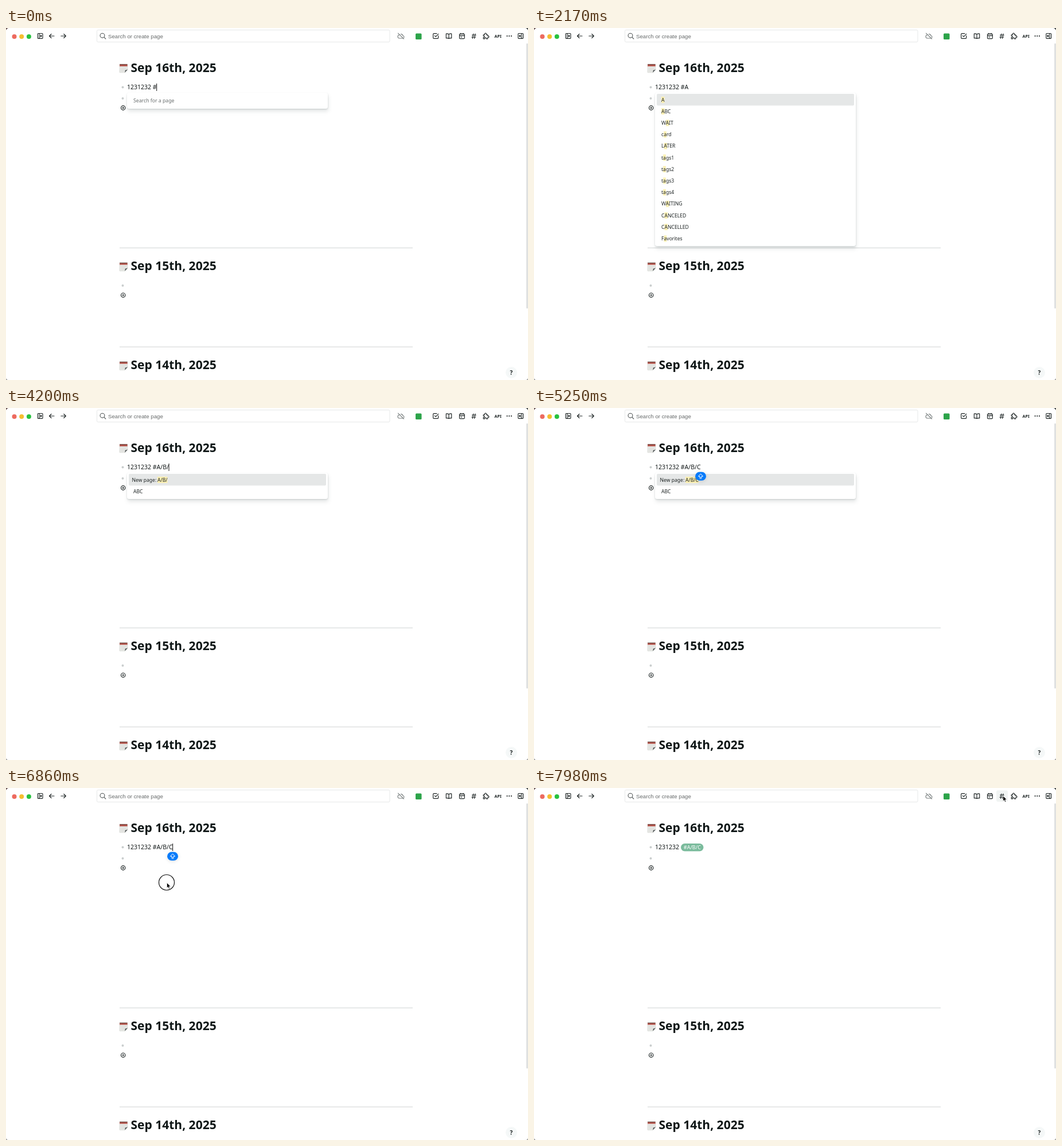
Recreate the animation shown at these times as an HTML page. Size 910 by 615 pixels, loop 8 s.

```html
<!DOCTYPE html>
<html lang="en">
<head>
<meta charset="utf-8">
<title>Journal tag typing</title>
<style>
html, body { margin: 0; width: 100%; height: 100%; overflow: hidden; background: #fff; }
svg { display: block; width: 910px; height: 615px; font-family: "Noto Sans", sans-serif; }
text { white-space: pre; }
.icon { fill: none; stroke: #1d2424; stroke-width: 1.15; stroke-linecap: round; stroke-linejoin: round; }
.title { font-size: 21px; font-weight: 700; fill: #0f1717; }
.block { font-size: 10.5px; fill: #141a1a; }
.row { font-size: 8.6px; fill: #202626; }
.popup { filter: drop-shadow(0 1px 1.2px rgba(20,40,40,.17)) drop-shadow(1px 5px 3px rgba(20,40,40,.1)); }
.badge { filter: drop-shadow(0 1px 2px rgba(0,0,0,.28)) drop-shadow(0 2px 4px rgba(0,0,0,.1)); }
.caps { filter: drop-shadow(0 1px 3px rgba(0,0,0,.12)); }
</style>
</head>
<body>
<svg viewBox="0 0 910 615">
  <defs>
    <g id="calendar">
      <path d="M.6 1H14L14.6 10.6 9.6 16H1.2Q.2 16 .2 15Z" fill="#e6e7e4" stroke="#d0d2cf" stroke-width=".5"/>
      <path d="M.7 1.2H13.9L14.2 5H.5Z" fill="#b9584f"/>
      <path d="M.7 1.2H13.9V2.6H.6Z" fill="#6d4540"/>
      <path d="M14.6 10.6 9.6 16 10.1 11.8Z" fill="#565b5b"/>
      <path d="M3 8H12M3 10.5H9M3 13H8" stroke="#d3d5d2" stroke-width=".6"/>
    </g>
    <g id="add" class="icon" stroke-width="1">
      <circle r="3.7"/><path d="M-1.3 0H1.3M0-1.3V1.3"/>
    </g>
    <path id="pointer" d="M0 0V9.4L2.1 7.5 3.5 10.8 5.2 10.1 3.8 6.9H6.7Z" fill="#000" stroke="#fff" stroke-width=".8" stroke-linejoin="round"/>
  </defs>

  <rect width="910" height="615" fill="#fff"/>
  <path d="M0 0H4Q1 1 0 4Z" fill="#614c4c"/>
  <path d="M910 0H906Q909 1 910 4Z" fill="#3c4040"/>
  <path d="M0 615V612Q1 614 3 615ZM910 615V612Q909 614 907 615Z" fill="#999"/>
  <rect x="907" y="27" width="3" height="463" rx="1" fill="#dfe1e1"/>

  <circle cx="14.5" cy="15" r="4" fill="#ed6a5f"/>
  <circle cx="27.2" cy="15" r="4" fill="#f5be30"/>
  <circle cx="39.9" cy="15" r="4" fill="#28c23f"/>
  <rect x="158.5" y="3.5" width="510.5" height="21" rx="2" fill="#fff" stroke="#e6e8e8"/>
  <text x="178" y="18" font-family="Liberation Sans, sans-serif" font-size="9.7" fill="#676b6b">Search or create page</text>

  <rect id="hover" x="806" y="4" width="20" height="20" rx="3" fill="#f1f4f3"/>
  <g class="icon">
    <rect x="55.2" y="9.5" width="8.8" height="8.8" rx="1"/><path d="M58 9.5V18.3M60.3 12.4V15.5L62.2 13.9Z"/>
    <path d="M84 14H75.5M79 10.5 75.5 14 79 17.5M95.8 14H104.3M100.8 10.5 104.3 14 100.8 17.5"/>
    <g stroke="#555b5b"><circle cx="168" cy="13.2" r="3.9"/><path d="M171 16.2 173.8 19"/></g>
    <path stroke="#7a8080" d="M683.5 9.2 693.5 19M686.2 11.7Q683 12.3 683 15.2 683.3 18 686 18H691.6M688.2 10.7Q691.2 10.5 692 13.5 694.6 14.2 693.6 17"/>
    <path d="M753.7 13.5V17Q753.7 18.4 752.3 18.4H746Q744.6 18.4 744.6 17V11Q744.6 9.6 746 9.6H751M747.2 13.3 749.2 15.2 753.8 10.4"/>
    <path d="M772 11Q769.5 9.3 767.3 10.1V17.8Q769.7 17.2 772 18.5 774.3 17.2 776.7 17.8V10.1Q774.5 9.3 772 11V18.4"/>
    <rect x="790.5" y="10.3" width="8.8" height="8.3" rx="1.2"/><path d="M790.5 13.3H799.3M792.8 9V11M797 9V11M793 15.8H794.4"/>
    <path d="M812.5 12.2H819.2M811.8 16H818.5M814.8 10 813.4 18.3M818 10 816.6 18.3"/>
    <path d="M832.2 11.8H834.6Q834 9 836 9 838 9 837.4 11.8H839.8V14Q842 13.5 842 15.2 842 17 839.8 16.4V18.8H837.3Q837.6 16.8 836 16.8 834.4 16.8 834.7 18.8H832.2V16.4Q834.4 16.5 834.4 15.2 834.4 13.9 832.2 14Z"/>
    <rect x="892.8" y="9.5" width="8.8" height="8.8" rx="1"/><path d="M898.8 9.5V18.3M896.5 12.4V15.5L894.6 13.9Z"/>
  </g>
  <rect x="714" y="9.5" width="10.5" height="10.5" rx="1.5" fill="#2da44a"/>
  <text x="857.6" y="17" text-anchor="middle" font-size="7.2" font-weight="800" fill="#1d2424">API</text>
  <g fill="#1d2424"><circle cx="873.6" cy="14" r="1.1"/><circle cx="877.3" cy="14" r="1.1"/><circle cx="881" cy="14" r="1.1"/></g>

  <g id="journal"></g>
  <circle cx="203.5" cy="103.5" r="2" fill="#c9cdcd"/>
  <circle cx="203.5" cy="123" r="2" fill="#c9cdcd"/>
  <use href="#add" x="204.2" y="139.6"/>
  <circle cx="203.5" cy="450" r="2" fill="#c9cdcd"/>
  <use href="#add" x="204.2" y="466.7"/>
  <path d="M198 384.2H709M198 557.2H709" stroke="#dfe1e1" stroke-width="1.4"/>
  <circle cx="881" cy="602" r="10" fill="#f5f8f8"/>
  <text x="881" y="605.6" text-anchor="middle" font-size="10" font-weight="700" fill="#1d2424">?</text>

  <g id="scene"></g>
</svg>
<script>
const LOOP = 8000, STEP = 70, LEFT = 211;
const TAGS = ["A", "ABC", "WAIT", "card", "LATER", "tags1", "tags2", "tags3", "tags4",
  "WAITING", "CANCELED", "CANCELLED", "Favorites"];
const $ = id => document.getElementById(id);
const pen = document.createElement("canvas").getContext("2d");

function widthOf(text, size) {
  pen.font = `100px "Noto Sans", sans-serif`;
  return pen.measureText(text).width * size / 100;
}
const within = (t, from, to) => t >= from && t < to;
const clamp = v => Math.min(1, Math.max(0, v));
const mix = (a, b, p) => a + (b - a) * p;
// The value of the last [time, value] pair already reached.
const latest = (pairs, t) => pairs.filter(p => t >= p[0]).pop()[1];

const TYPED = [[0, "#"], [350, "#A"], [2310, "#A/"], [3150, "#A/B"], [4200, "#A/B/"], [4760, "#A/B/C"]];
const CARET = [[0, 1], [1120, 0], [1610, 1], [2170, 0], [2310, 1], [2870, 0], [3150, 1], [3710, 0],
  [4200, 1], [5250, 0], [5810, 1], [6300, 0], [6790, 1]];
const CAPS = [[2870, 3150], [3710, 4200], [5250, 5740], [6300, 6930]];
const TAGGED = 6930;

const rowText = (x, y, text) => `<text class="row" x="${x}" y="${y + 3.1}">${text}</text>`;
const mark = (x, y, text) =>
  `<rect x="${x}" y="${y - 5.5}" width="${widthOf(text, 8.6)}" height="11" fill="#fcf1b4"/>`;
const panel = bottom =>
  `<rect class="popup" x="211" y="113" width="350" height="${bottom - 113}" rx="3.5" fill="#fff"/>`;
const selection = height =>
  `<rect x="214" y="115" width="344" height="${height}" rx="2" fill="#e5e7e7"/>`;

function tagList(first, pitch, marked) {
  const rows = TAGS.map((tag, i) => {
    const y = first + i * pitch, at = tag.search(/a/i);
    const hit = marked && at >= 0 ? mark(222 + widthOf(tag.slice(0, at), 8.6), y, tag[at]) : "";
    return hit + rowText(222, y, tag);
  });
  return panel(first + 12 * pitch + 13) + selection(pitch + .3) + rows.join("");
}

function newPage(name) {
  return panel(159) + selection(20.5) + rowText(219.5, 125.5, "New page:") +
    mark(264, 125.5, name) + rowText(264, 125.5, name) + rowText(222, 146, "ABC");
}

function popup(t, typed) {
  if (t < 350) return panel(141) +
    `<text x="222" y="130" font-size="8.7" fill="#6a6f6f">Search for a page</text>`;
  if (t < 2380) return tagList(125.4, 20.21, true);
  if (t < 3150) return tagList(126, 20.83, false);
  return t < 5740 ? newPage(typed.slice(1)) : "";
}

function inputBadge(t) {
  if (!within(t, 350, 1610)) return "";
  const p = clamp((t - 280) / 280);
  return `<g class="badge" opacity="${p}"><rect x="263" y="113" width="21.5" height="22" rx="4" fill="#fff"/>
    <text x="273.7" y="128.2" text-anchor="middle" font-family="Inter, sans-serif" font-size="11.8" fill="#414646">A</text></g>`;
}

function capsBadge(t, x) {
  if (!CAPS.some(([from, to]) => within(t, from, to))) return "";
  return `<g class="caps" transform="translate(${x} 119.2)">
    <rect x="-9.5" y="-7.5" width="19" height="15" rx="7.5" fill="#087bfa"/>
    <path d="M0-4.3 4 .1H1.9V2H-1.9V.1H-4ZM-1.9 4H1.9" fill="none" stroke="#fff" stroke-width="1" stroke-linejoin="round"/></g>`;
}

function pointerAt(t) {
  const nudge = clamp((t - 6930) / 140), p = clamp((t - 7210) / 770);
  const ease = p < .5 ? 4 * p ** 3 : 1 - (2 - 2 * p) ** 3 / 2;
  return [mix(mix(280.4, 274.8, nudge), 817.6, ease), mix(mix(165.4, 161.4, nudge), 13.6, ease)];
}

function pointer(t) {
  if (t < 6580) return "";
  const [x, y] = pointerAt(t);
  const ring = within(t, 6790, 7070)
    ? `<circle cx="280" cy="165" r="13.5" fill="none" stroke="#111" stroke-width="1.2" opacity="${t < 6860 ? .6 : t < 7000 ? 1 : .4}"/>` : "";
  return ring + `<use href="#pointer" x="${x}" y="${y}" opacity="${t < 6650 ? .6 : 1}"/>`;
}

function block(t, typed, caretX) {
  if (t >= TAGGED) return `<text class="block" x="${LEFT}" y="107.2">1231232</text>
    <rect x="256" y="97" width="39.5" height="13.5" rx="6.75" fill="#7abb9c"/>
    <text x="260.8" y="107" font-size="9.1" fill="#fff">#A/B/C</text>`;
  const caret = latest(CARET, t) ? `<rect x="${caretX - .4}" y="97" width="1" height="13" fill="#111"/>` : "";
  return `<text class="block" x="${LEFT}" y="107.2">1231232 ${typed}</text>` + caret;
}

let shown = -1;
function draw(now) {
  const t = Math.floor(now % LOOP / STEP) * STEP;
  if (t !== shown) {
    shown = t;
    const typed = latest(TYPED, t);
    const caretX = LEFT + widthOf("1231232 " + typed, 10.5);
    $("scene").innerHTML = popup(t, typed) + block(t, typed, caretX) +
      inputBadge(t) + capsBadge(t, caretX) + pointer(t);
    const [x, y] = pointerAt(t);
    $("hover").style.display = x > 806 && y < 24 ? "" : "none";
  }
  requestAnimationFrame(draw);
}

$("journal").innerHTML = [[16, 76.5], [15, 423.2], [14, 596.2]].map(([day, y]) =>
  `<use href="#calendar" x="197.6" y="${y - 14.5}"/><text class="title" x="217.5" y="${y}">Sep ${day}th, 2025</text>`).join("");
requestAnimationFrame(draw);
</script>
</body>
</html>
```
